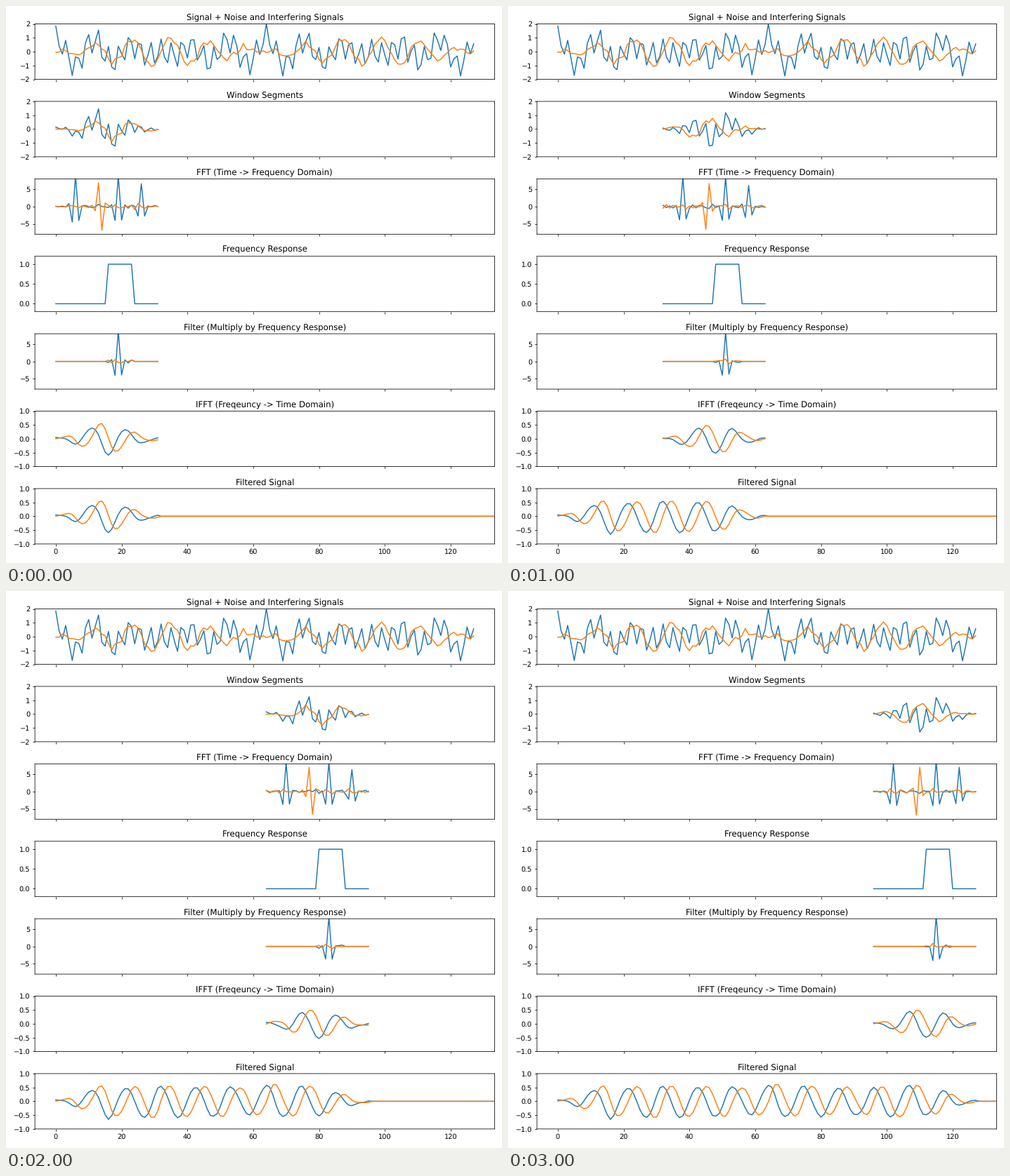
Animation of 706x794 px, one loop 3.5 s. Source, as a matplotlib script:

```python
import numpy as np
import matplotlib.pyplot as plt
from matplotlib.animation import FuncAnimation

W, H, DPI = 706, 794, 70.6
EPS = 1e-9  # keeps the pixel size from rounding down
N, SIZE, HOP = 128, 32, 16
STEPS = (N - SIZE) // HOP + 1

plt.rcdefaults()
plt.rcParams["text.hinting"] = "none"

TONES = [(0.52, 3), (0.5, -2.5), (0.5, -10), (0.4, 10)]  # amplitude, bin
NOISE = 0.08


def make_signal():
    rng = np.random.default_rng(5)
    t = 2j * np.pi * np.arange(N) / SIZE
    clean = sum(a * np.exp(t * f) for a, f in TONES)
    return clean + NOISE * (rng.normal(size=N) + 1j * rng.normal(size=N))


signal = make_signal()
window = np.hamming(SIZE)
bins = np.arange(SIZE)
response = ((bins >= 16) & (bins < 24)).astype(float)


def process(step):
    """Return each stage of the filter for one window position."""
    start = step * HOP
    seg = signal[start:start + SIZE] * window
    spec = np.fft.fftshift(np.fft.fft(seg))
    passed = spec * response
    return seg, spec, passed, np.fft.ifft(np.fft.ifftshift(passed))


def overlap_add(last):
    out = np.zeros(N + HOP, complex)
    for step in range(last + 1):
        start = step * HOP
        out[start:start + SIZE] += process(step)[-1]
    return out


# title, y limits, tick step
PANELS = [
    ("Signal + Noise and Interfering Signals", (-2, 2), 1),
    ("Window Segments", (-2, 2), 1),
    ("FFT (Time -> Frequency Domain)", (-8, 8), 5),
    ("Frequency Response", (-0.2, 1.2), 0.5),
    ("Filter (Multiply by Frequency Response)", (-8, 8), 5),
    ("IFFT (Freqeuncy -> Time Domain)", (-1, 1), 0.5),
    ("Filtered Signal", (-1, 1), 0.5),
]

fig, axes = plt.subplots(len(PANELS), 1, sharex=True, dpi=DPI,
                         figsize=(W / DPI + EPS, H / DPI + EPS))
pairs = []
for ax, (title, (low, high), gap) in zip(axes, PANELS):
    ax.set_title(title)
    ax.set_xlim(-6.35, 133.35)
    ax.set_xticks(range(0, 121, 20))
    ax.set_yticks(np.arange(np.ceil(low / gap), high // gap + 1) * gap)
    ax.set_ylim(low, high)
    for spine in ax.spines.values():
        spine.set_snap(False)
    pairs.append([ax.plot([], [], color=c)[0] for c in ("C0", "C1")])
fig.tight_layout()


def show(pair, x, z):
    pair[0].set_data(x, z.real)
    pair[1].set_data(x, z.imag)


def update(step):
    x = step * HOP + bins
    seg, spec, passed, back = process(step)
    show(pairs[0], np.arange(N), signal)
    show(pairs[1], x, seg)
    show(pairs[2], x, spec)
    pairs[3][0].set_data(x, response)
    show(pairs[4], x, passed)
    show(pairs[5], x, back)
    show(pairs[6], np.arange(N + HOP), overlap_add(step))
    return [line for pair in pairs for line in pair]


def reset():
    return update(0)


anim = FuncAnimation(fig, update, frames=STEPS, init_func=reset,
                     interval=500, repeat=True, repeat_delay=0)
plt.show()
```
